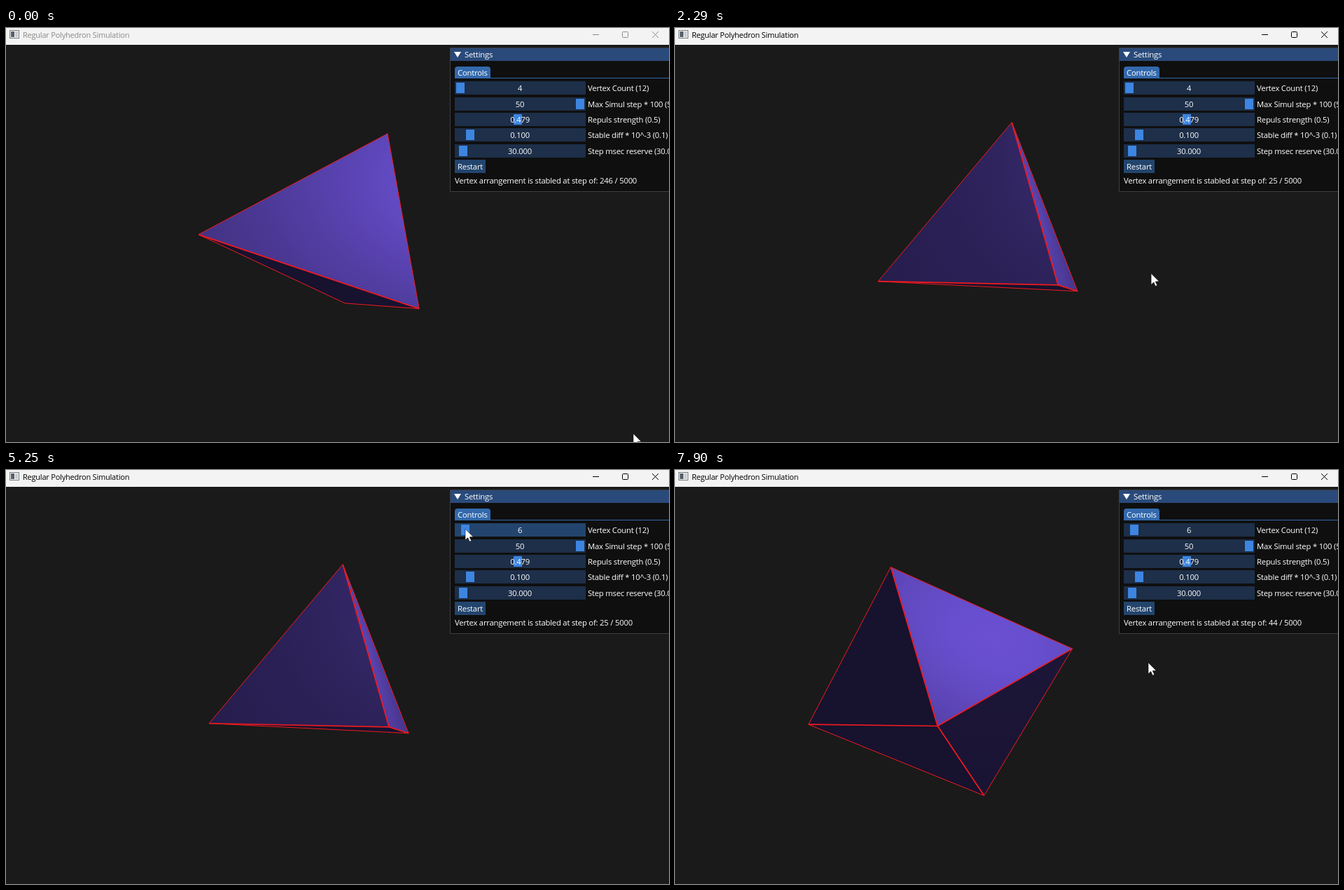
Write an HTML page with a canvas that moves like this. It is 947x591 px and loops after 8 s.

```html
<!DOCTYPE html>
<html lang="en">
<head>
<meta charset="utf-8">
<title>Regular Polyhedron Simulation</title>
<style>
html, body { margin: 0; width: 100%; height: 100%; overflow: hidden; background: #1a1a1a; }
canvas { display: block; }
</style>
</head>
<body>
<canvas id="stage" width="947" height="591"></canvas>
<script>
const ctx = document.getElementById('stage').getContext('2d');
const LOOP = 8000, STEP = 78.33;
const FONT = '"Open Sans", "Noto Sans", sans-serif';

// ---- Vectors: x right, y down, z towards the viewer
const add = (a, b, s = 1) => a.map((v, i) => v + b[i] * s);
const scale = (a, s) => a.map(v => v * s);
const dot = (a, b) => a[0] * b[0] + a[1] * b[1] + a[2] * b[2];
const cross = (a, b) => [0, 1, 2].map(i => {
  const j = (i + 1) % 3, k = (i + 2) % 3;
  return a[j] * b[k] - a[k] * b[j];
});
const unit = a => scale(a, 1 / Math.hypot(...a));

// ---- Solids, with vertices on the unit sphere
const LIGHT = [.9, -1.1, 1.2], DISTANCE = 5;
const firstTetra = [[.38, -.916, -.131], [-.915, -.077, .33], [.507, .437, .743], [.076, .547, -.834]];
const tetra = [[.051, -.996, -.068], [-.936, .304, -.174], [.591, .424, -.686], [.311, .264, .913]];
const axes = [[-.31, -.915, .238], [.945, -.304, .03], [.078, .254, .965]];
const octa = [...axes, ...axes.map(a => scale(a, -1))];
const octaStart = [[-.349, -.845, .405], [.811, -.542, .2], [.025, .644, .765],
                   [.321, .88, -.349], [-.87, .007, .494], octa[5]];
const tetraStart = tetra.map((p, i) => p.map((v, j) => v + .15 * Math.sin(7 * i + 3 * j)));

// Repulsion pulls the vertices from a start towards the balanced solid
const settle = (start, rest, ms) =>
  rest.map((p, i) => add(p, add(start[i], p, -1), Math.exp(-ms / 213)));

function hull(pts) {
  const faces = [];
  for (let i = 0; i < pts.length; i++)
    for (let j = 0; j < i; j++)
      for (let k = 0; k < j; k++) {
        let n = unit(cross(add(pts[j], pts[i], -1), add(pts[k], pts[i], -1)));
        if (dot(n, pts[i]) < 0) n = scale(n, -1);
        const d = dot(n, pts[i]);
        if (pts.every(p => dot(n, p) < d + 1e-6)) faces.push({ ids: [i, j, k], n, d });
      }
  return faces;
}

function shade(level) {
  return `rgb(${[106, 80, 210].map(c => c * (.22 + .78 * level))})`;
}

function drawSolid(pts, pan) {
  const project = ([x, y, z]) =>
    [471 + 1000 * (x + pan) / (DISTANCE - z), 309.5 + 889 * y / (DISTANCE - z)];
  const screen = pts.map(project);
  const edges = {};

  for (const { ids, n, d } of hull(pts)) {
    if (dot(n, [-pan, 0, DISTANCE]) <= d) continue; // back face
    ctx.beginPath();
    ids.forEach(i => ctx.lineTo(...screen[i]));
    ctx.closePath();
    const height = dot(n, LIGHT) - d;
    ctx.save();
    if (height > 0) {
      // Diffuse falloff around the light's foot, drawn in the plane of the face
      const foot = add(LIGHT, n, -height), o = project(foot);
      const u = unit(add(pts[ids[0]], foot, -1)), v = cross(n, u);
      const [ux, vx] = [u, v].map(w => scale(add(project(add(foot, w, .1)), o, -1), 10));
      ctx.transform(...ux, ...vx, ...o);
      const glow = ctx.createRadialGradient(0, 0, 0, 0, 0, 4);
      for (let r = 0; r <= 4; r += .25) glow.addColorStop(r / 4, shade(height / Math.hypot(height, r)));
      ctx.fillStyle = glow;
    } else ctx.fillStyle = shade(0);
    ctx.fill();
    ctx.restore();
    ids.forEach((a, i) => {
      const key = [a, ids[(i + 1) % 3]].sort();
      edges[key] = (edges[key] || 0) + 1;
    });
  }

  ctx.strokeStyle = '#f01a1e';
  for (const key in edges) {
    const [a, b] = key.split(',');
    ctx.lineWidth = edges[key] > 1 ? 1.7 : 1;
    ctx.beginPath();
    ctx.moveTo(...screen[a]);
    ctx.lineTo(...screen[b]);
    ctx.stroke();
  }
}

// ---- Cursor moves: [start, end, x, y]
const moves = [
  [70, 650, 684, 194], [1670, 1900, 690, 130], [1900, 2300, 680, 352], [2300, 3060, 661, 88],
  [3150, 3530, 658, 78], [3920, 4060, 657, 99], [4150, 4300, 656, 86], [4620, 4850, 656, 84],
  [5250, 5630, 673, 196], [6200, 6509, 682, 241], [6509, 7200, 676, 275]
];

function cursorAt(t) {
  let x = 896, y = 579;
  for (const [start, end, tx, ty] of moves) {
    const p = Math.min(1, Math.max(0, (t - start) / (end - start)));
    const s = p * p * (3 - 2 * p);
    x += (tx - x) * s;
    y += (ty - y) * s;
  }
  return [x, y];
}

// ---- Window
function rect(x, y, w, h, color, radii = 0) {
  ctx.fillStyle = color;
  ctx.beginPath();
  ctx.roundRect(x, y, w, h, radii);
  ctx.fill();
}

function poly(points, color) {
  ctx.beginPath();
  points.forEach(p => ctx.lineTo(...p));
  ctx.closePath();
  ctx.fillStyle = color;
  ctx.fill();
}

function text(str, x, y, color = '#fff', align = 'left', size = 11.3) {
  ctx.font = `${size}px ${FONT}`;
  ctx.letterSpacing = '-.22px';
  ctx.textAlign = align;
  ctx.fillStyle = color;
  ctx.fillText(str, x, y);
}

function drawTitleBar(focused) {
  const ink = focused ? '#000' : '#8a8a8a';
  rect(0, 0, 947, 24, '#f3f3f3');
  rect(5, 3, 14, 12, '#777b80');
  rect(6, 4, 12, 10, '#f4f4f4');
  rect(7, 5, 5, 8, '#55606b');
  rect(13, 5, 4, 8, '#c9cdd1');
  text('Regular Polyhedron Simulation', 24, 14, ink, 'left', 11);
  ctx.strokeStyle = ink;
  ctx.lineWidth = 1;
  ctx.beginPath();
  ctx.moveTo(838, 9.5); ctx.lineTo(847, 9.5);
  ctx.roundRect(880.5, 5.5, 8, 8, 1);
  ctx.moveTo(923, 5); ctx.lineTo(932, 14);
  ctx.moveTo(932, 5); ctx.lineTo(923, 14);
  ctx.stroke();
}

function drawPanel(t, mx, my) {
  const inside = (x, y, w, h) => mx >= x && mx < x + w && my >= y && my < y + h;
  const count = t < 4300 ? 4 : 6;
  const rows = [
    [643 + (count - 4) * 3.6, count, 'Vertex Count (12)'],
    [814, '50', 'Max Simul step * 100 (50)'],
    [725, '0.479', 'Repuls strength (0.5)'],
    [657, '0.100', 'Stable diff * 10^-3 (0.1)'],
    [647, '30.000', 'Step msec reserve (30.0)']
  ];
  rect(634, 28, 320, 206, '#3e3e45');
  rect(635, 29, 320, 204, '#0f0f0f');
  rect(635, 29, 320, 18, '#294a7a');
  poly([[640, 34], [650, 34], [645, 42]], '#fff');
  text('Settings', 655, 42);
  rect(641, 55, 51, 17, '#3369ad', [4, 4, 0, 0]);
  rect(641, 71, 306, 1, '#3369ad');
  text('Controls', 645, 68);

  rows.forEach(([grab, value, label], i) => {
    const y = Math.round(76.2 + 22.4 * i);
    const active = i === 0 && t >= 4300 && t < 4530;
    rect(641, y, 187, 19, active ? '#316aab' : inside(641, y, 187, 19) ? '#23456d' : '#1d2f49');
    rect(Math.round(grab), y + 2, 12, 15, active ? '#4296fa' : '#3d85e0');
    text(value, 734, y + 14, '#fff', 'center');
    text(label, 831, y + 14);
  });

  rect(641, 188, 44, 19, inside(641, 188, 45, 19) ? '#4296fa' : '#23456d');
  text('Restart', 645, 202);
  const busy = t >= 810 && t < 1670 || t >= 5970 && t < 7360;
  const steps = t < 810 ? 246 : t < 5970 ? 25 : 44;
  text(busy ? 'Restarted. On Progress...'
            : `Vertex arrangement is stabled at step of: ${steps} / 5000`, 641, 222);
}

function drawCursor(x, y) {
  const arrow = [[0, 0], [0, 16], [3.7, 12.6], [6.2, 18.2], [8.7, 17], [6.2, 11.6], [11.3, 11.4]];
  poly(arrow.map(p => add(p, [x, y])), '#fff');
  ctx.strokeStyle = '#111';
  ctx.lineWidth = .6;
  ctx.stroke();
}

function draw(t) {
  const q = 6040 + Math.floor((t + 8 - 6040) / STEP) * STEP;
  const mouse = cursorAt(q);
  const pan = t < 7820 ? 0 : t < 7900 ? -.2325 : -.465;
  rect(0, 0, 947, 591, '#1a1a1a');
  drawSolid(t < 810 ? firstTetra
    : t < 5970 ? settle(tetraStart, tetra, Math.max(0, q - 810))
    : settle(octaStart, octa, q - 6040), pan);
  drawTitleBar(t >= 810);
  drawPanel(t, ...mouse);
  drawCursor(...mouse);
}

const start = performance.now();
function tick() {
  draw((performance.now() - start) % LOOP);
  requestAnimationFrame(tick);
}
tick();
</script>
</body>
</html>
```
